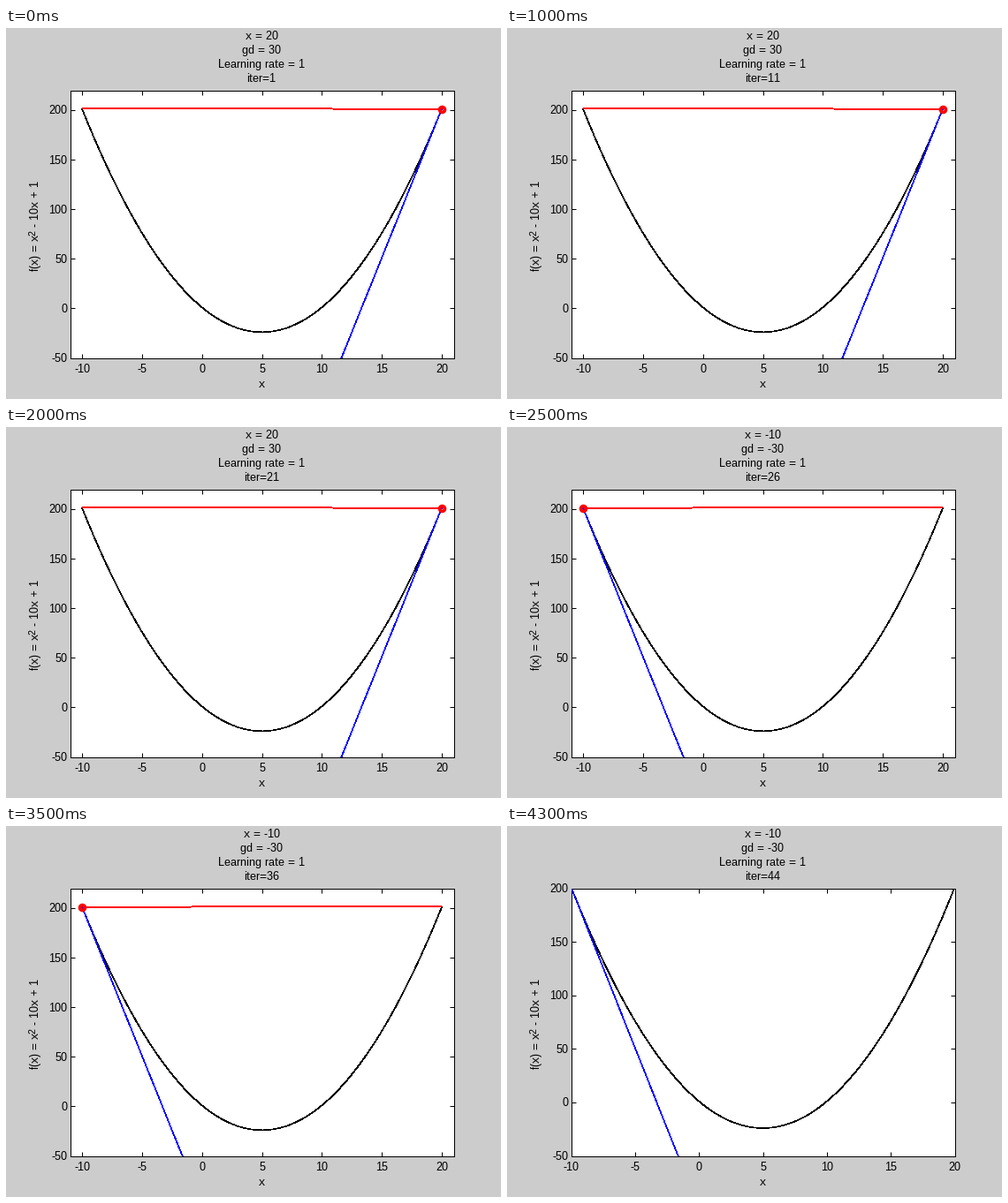
A matplotlib script that plays this animation: 560x420 px, repeating every 4400 ms.

```python
import numpy as np
import matplotlib.pyplot as plt
from matplotlib.animation import FuncAnimation

W, H, DPI = 560, 420, 80
PX = 72 / DPI  # points per pixel
FRAMES, STEP_MS = 44, 100
LEFT, RIGHT, TOP, BOTTOM = 72.52, 506.52, 70.52, 373.52
MID = 289

plt.rcParams.update({
    "font.family": "Liberation Sans",
    "font.size": 13 * PX,
    "text.hinting": "native",
    "text.hinting_factor": 1,
})

WIDE = (-11, 21, -50, 220)
TIGHT = (-10, 20, -50, 200)
XTICKS = range(-10, 21, 5)
YTICKS = range(-50, 201, 50)


def f(x):
    return x ** 2 - 10 * x + 1


def grad(x):
    return 2 * x - 10


fig = plt.figure(figsize=(W / DPI, H / DPI), dpi=DPI, facecolor="#cccccc")
ax = fig.add_axes([LEFT / W, 1 - BOTTOM / H,
                   (RIGHT - LEFT) / W, (BOTTOM - TOP) / H])
ax.set_xticks(XTICKS)
ax.set_yticks(YTICKS)
ax.tick_params(direction="in", length=5 * PX, width=PX, top=True, right=True,
               labelbottom=False, labelleft=False)
for spine in ax.spines.values():
    spine.set_linewidth(PX)


def label(x, y, text="", ha="center", **kw):
    return fig.text(x / W, 1 - y / H, text, ha=ha, va="baseline", **kw)


def upright(x, y, text, size=13):
    label(x, y, text, "left", rotation=90, rotation_mode="anchor",
          fontsize=size * PX)


def tick_labels(view):
    x0, x1, y0, y1 = view
    sx, sy = (RIGHT - LEFT) / (x1 - x0), (BOTTOM - TOP) / (y1 - y0)
    return ([label(LEFT + (v - x0) * sx, 390, str(v)) for v in XTICKS]
            + [label(69.5, BOTTOM - (v - y0) * sy + 4.5, str(v), "right")
               for v in YTICKS])


def stroke(color, width, z):
    # without antialiasing every touched pixel is filled, so widths stay small
    return ax.plot([], [], color=color, lw=width * PX, antialiased=False,
                   solid_capstyle="butt", zorder=z)[0]


wide_labels = tick_labels(WIDE)
tight_labels = tick_labels(TIGHT)
title = [label(MID, 13 + 16 * i) for i in range(4)]
label(MID, 407, "x")
upright(37, 275, "f(x) = x")
upright(33, 235, "2", 11)
upright(37, 225, "- 10x + 1")

curve = stroke("black", 0.65, 2)
xs = np.linspace(-10, 20, 301)
curve.set_data(xs, f(xs))
jump = stroke("red", 1, 3)
tangent = stroke("blue", 0.6, 4)
dot, = ax.plot([], [], "o", ms=5.9 * PX, mfc="none", mec="red", mew=3.7 * PX,
               zorder=5, clip_on=False)


def draw(k):
    x = 20 if k % 2 == 0 else -10
    g = grad(x)
    last = k == FRAMES - 1

    view = TIGHT if last else WIDE
    ax.set_xlim(view[:2])
    ax.set_ylim(view[2:])
    for t in wide_labels:
        t.set_visible(not last)
    for t in tight_labels:
        t.set_visible(last)

    lines = (f"x = {x}", f"gd = {g}", "Learning rate = 1", f"iter={k + 1}")
    for t, s in zip(title, lines):
        t.set_text(s)

    tangent.set_data([x, x - (f(x) + 60) / g], [f(x), -60])
    jump.set_data([x, x - g], [f(x), f(x) + 1])
    dot.set_data([x], [f(x)])
    jump.set_visible(not last)
    dot.set_visible(not last)
    return []


anim = FuncAnimation(fig, draw, frames=FRAMES, interval=STEP_MS,
                     init_func=lambda: draw(0), repeat=True, repeat_delay=0,
                     blit=False)
plt.show()
```
